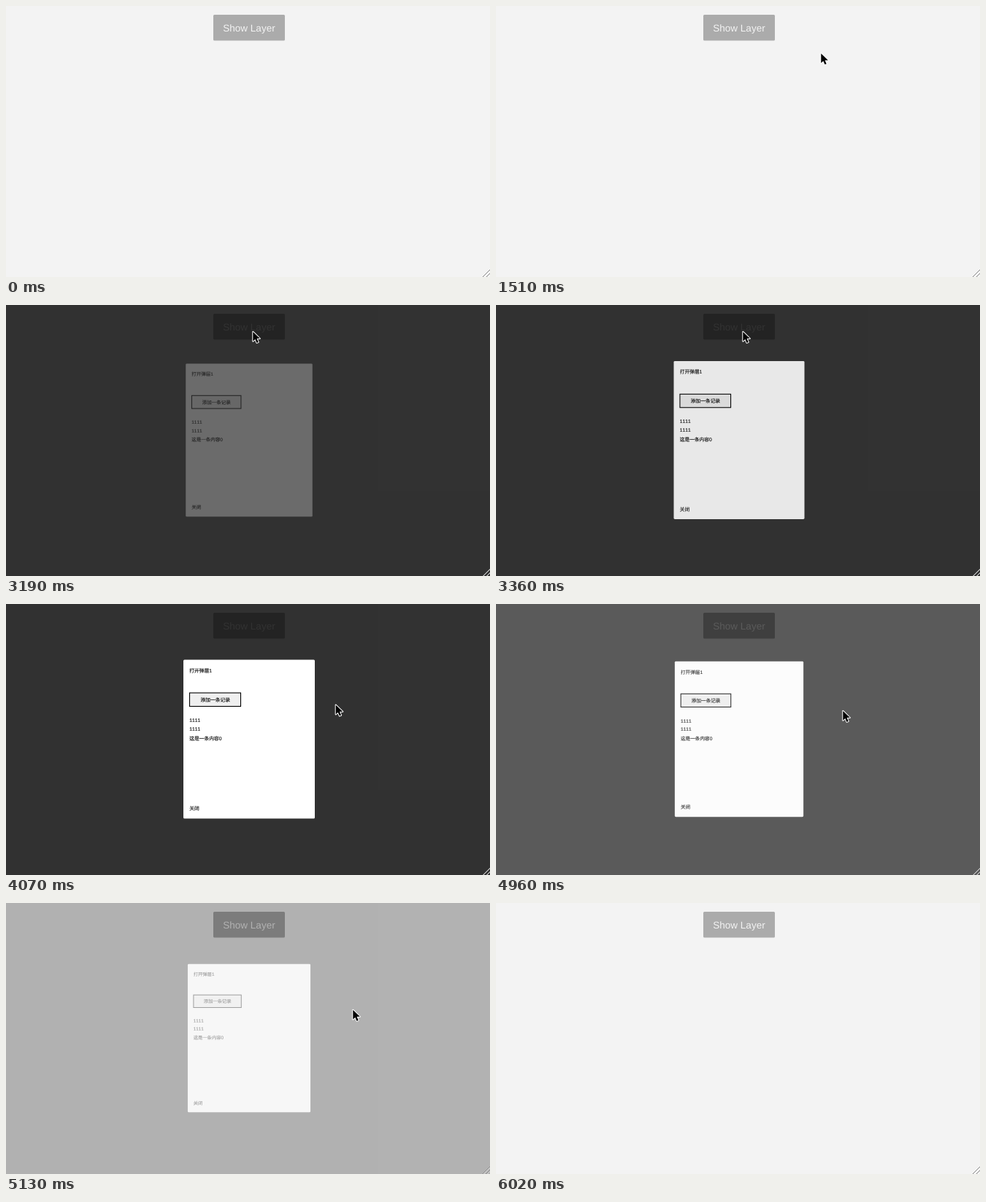
Write an HTML page that moves like this. It is 663 px wide and 372 px high and loops after 7.19 s.

```html
<!DOCTYPE html>
<html lang="zh">
<head>
<meta charset="utf-8">
<title>Show Layer</title>
<style>
  html, body { margin: 0; width: 100%; height: 100%; overflow: hidden; background: #f3f3f3; }
  svg { display: block; width: 663px; height: 372px; }
  text {
    font-family: "Liberation Sans", Arial, "Noto Sans CJK SC", "Noto Sans CJK", sans-serif;
    font-kerning: none;
    text-rendering: geometricPrecision;
  }
  #panel text { font-size: 6.75px; fill: #111; stroke: #111; stroke-width: .15px; }
</style>
</head>
<body>
<svg viewBox="0 0 663 372">
  <rect width="663" height="372" fill="#f3f3f3"/>
  <rect x="284" y="12" width="98" height="35.5" rx="1.5" fill="#ababab"/>
  <text x="333" y="35" font-size="13.5" text-anchor="middle" fill="#f3f3f3">Show Layer</text>

  <g id="layer">
    <rect width="663" height="372" fill="#000" fill-opacity=".795"/>
    <g id="panel">
      <rect x="243" y="76.5" width="180" height="218" rx="1.5" fill="#fff"/>
      <text x="251.3" y="93.8">打开弹层1</text>
      <rect x="251.5" y="122" width="70" height="18.5" fill="#efefef" stroke="#000" stroke-width="1.1"/>
      <text x="286.7" y="133.7" text-anchor="middle">添加一条记录</text>
      <text x="251.3" y="162.3">1111</text>
      <text x="251.3" y="174.1">1111</text>
      <text x="251.3" y="186.7">这是一条内容0</text>
      <text x="251.3" y="283.2">关闭</text>
    </g>
  </g>

  <g fill="none">
    <path d="M653 373L664 362M658 373L664 367" stroke="#fff" stroke-opacity=".75"/>
    <path d="M652 373L664 361M657 373L664 366" stroke="#808080"/>
  </g>
  <path id="cursor" d="M.3 .8V13.8L3.3 11L5.5 15.9L7.7 15L5.6 10.1H9.9Z"
        fill="#000" stroke="#fff" stroke-width="2" stroke-linejoin="round" paint-order="stroke"/>
</svg>
<script>
  const LOOP = 7190, START = 900, TICK = 88.28;
  const CENTER = [333, 185.5];
  const [layer, panel, cursor] = ["layer", "panel", "cursor"].map(id => document.getElementById(id));

  const clamp = v => Math.min(1, Math.max(0, v));
  const easeOut = (t, power) => 1 - (1 - t) ** power;
  const mix = (a, b, k) => a.map((v, i) => v + (b[i] - v) * k);

  // Mouse gestures in ticks; "via" bends the way, "power" slows its end.
  const gestures = [
    { begin: -1, end: 3, to: [457, 65], power: 2 },
    { begin: 6, end: 14, to: [360, 29], via: [409, 65] },
    { begin: 16, end: 20, to: [336, 29] },
    { begin: 23, end: 24, to: [338, 36] },
    { begin: 30, end: 34, to: [408, 104] },
    { begin: 34, end: 40, to: [475, 146], via: [454, 146], power: 2 },
    { begin: 52, end: 58, to: [670, 400] }
  ];

  function cursorAt(tick) {
    let at = [470, -30];
    for (const { begin, end, to, via = mix(at, to, 0.5), power = 1 } of gestures) {
      const k = easeOut(clamp((tick - begin) / (end - begin)), power);
      at = mix(mix(at, via, k), mix(via, to, k), k);
      if (k < 1) break;
    }
    return at;
  }

  function scaleAbout([x, y], s) {
    return `translate(${x} ${y}) scale(${s}) translate(${-x} ${-y})`;
  }

  function render(ms) {
    // The picture advances in discrete ticks.
    const tick = Math.floor((ms - START) / TICK + 0.15);
    const opened = easeOut(clamp((tick - 25.5) / 4.8), 3);
    const remaining = 1 - clamp((tick - 43) / 6) ** 2.26;

    layer.style.display = tick >= 26 && tick < 49 ? "" : "none";
    layer.setAttribute("opacity", remaining);
    panel.setAttribute("opacity", opened);
    panel.setAttribute("transform",
      scaleAbout(CENTER, (0.95 + 0.05 * opened) * (0.9 + 0.1 * remaining)));
    cursor.setAttribute("transform", `translate(${cursorAt(tick)})`);
  }

  const origin = performance.now();
  function frame() {
    render((performance.now() - origin) % LOOP);
    requestAnimationFrame(frame);
  }
  frame();
</script>
</body>
</html>
```
